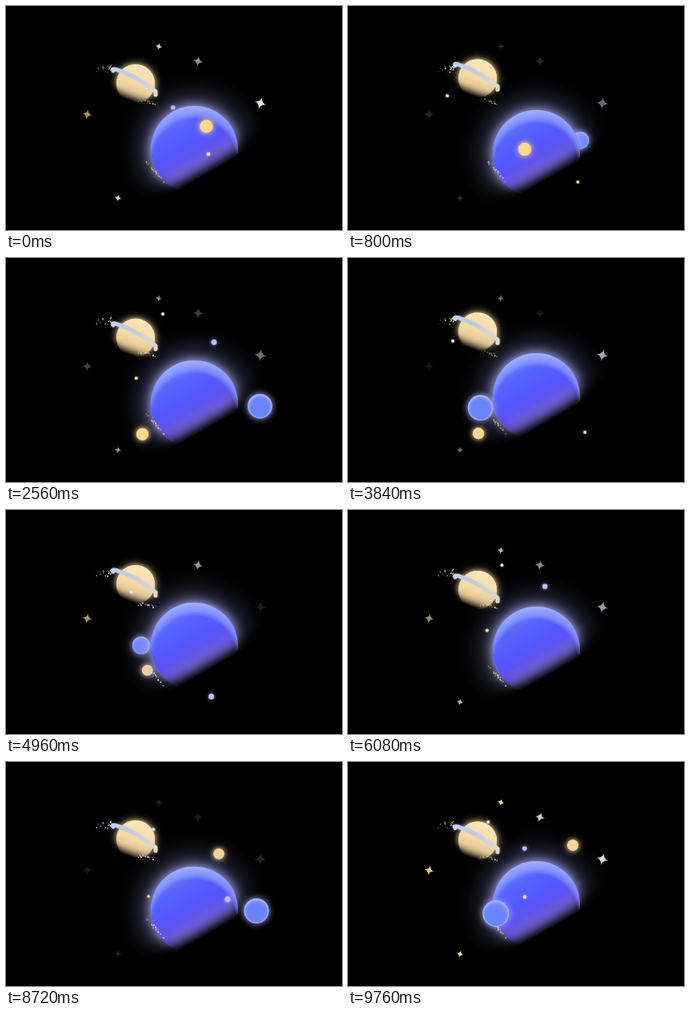
An HTML page with a canvas for the animation above (9840 ms loop, 420 px wide and 280 px high).

```html
<!DOCTYPE html>
<html lang="en">
<head>
<meta charset="utf-8">
<title>Planets</title>
<style>
  html, body { margin: 0; width: 100%; height: 100%; overflow: hidden; background: #000; }
  canvas { display: block; }
</style>
</head>
<body>
<canvas id="stage" width="420" height="280"></canvas>
<script>
const ctx = document.getElementById('stage').getContext('2d');
const LOOP = 9840, STEP = 80, ORBIT = 3320, TAU = Math.PI * 2;
const RAD = Math.PI / 180;
const cos = deg => Math.cos(deg * RAD);
const sin = deg => Math.sin(deg * RAD);
const wave = (t, peak, period = ORBIT) => Math.cos(TAU * (t - peak) / period);

function seeded(seed) {
  return () => (seed = (seed * 16807) % 2147483647) / 2147483647;
}

function gradient(g, stops) {
  stops.forEach(([at, color]) => g.addColorStop(at, color));
  return g;
}

function disc(x, y, r, fill, glow, blur = 0) {
  ctx.save();
  ctx.shadowColor = glow || 'transparent';
  ctx.shadowBlur = blur;
  ctx.fillStyle = fill;
  ctx.beginPath();
  ctx.arc(x, y, r, 0, TAU);
  ctx.fill();
  ctx.restore();
}

// Orbits: each returns a place, a radius and whether the moon is behind.
function blueMoon(t) {
  const a = 360 * (t - 2090) / 6094;
  const p = a + 28 * (1 - cos(a));
  return { x: 236 + 95 * cos(p), y: 178.5 + 13 * sin(p), r: 13.5 + 3.5 * sin(p), behind: sin(p) < -0.6, draw: drawBlue };
}

function goldMoon(t) {
  const p = 73 + 0.0345 * t - 7.8e-7 * t * t;
  const along = 88 * cos(p), across = 9 * sin(p);
  return { x: 226 + 0.72 * along + 0.69 * across, y: 162 - 0.69 * along + 0.72 * across,
    r: 7.2 + 0.8 * sin(p), behind: sin(p) < -0.2, draw: drawGold };
}

function lilacMoon(t) {
  const a = 52 + 360 * t / ORBIT;
  const p = a + 10 * cos(a - 20) - 6;
  return { x: 236 - 41 * sin(p) + 6.5 * cos(p) + 2.5 * sin(2 * p), y: 171 - 76 * cos(p),
    r: 3.2 - 0.6 * sin(p), behind: sin(p) > 0.4, draw: drawLilac };
}

function amberMoon(t) {
  const a = 20.6 + 360 * (t - 2560) / ORBIT;
  const p = a - 16 * cos(a);
  return { x: 229 - 67 * cos(p) + 5 * sin(p), y: 185 - 34 * cos(p) - 10 * sin(p),
    r: 2 + 0.3 * sin(p), behind: sin(p) < -0.72, draw: drawAmber };
}

function paleMoon(t) {
  const p = 82 + 360 * t / ORBIT;
  return { x: 160 + 36 * cos(p) - 3 * sin(p), y: 92 - 22 * cos(p) - 7 * sin(p),
    r: 2, behind: sin(p) > 0, draw: drawPale };
}

function drawBlue({ x, y, r }) {
  const fill = gradient(ctx.createRadialGradient(x, y + r * 0.15, r * 0.7, x, y, r),
    [[0, '#6a83ff'], [0.5, '#7a90ff'], [1, '#b0bcff']]);
  disc(x, y, r, fill, '#a9b2ff', 9);
}
function drawGold({ x, y, r }) {
  disc(x, y, r, '#f9d68e', '#e8c27c', 9);
  disc(x, y, r, '#f9d88f', 'rgba(250,215,150,.6)', 5);
}
const drawLilac = ({ x, y, r }) => disc(x, y, r, '#bdb9f4', 'rgba(180,180,255,.7)', 4);
const drawAmber = ({ x, y, r }) => disc(x, y, r, '#ffd98c', 'rgba(255,205,125,.6)', 3);
const drawPale = ({ x, y, r }) => disc(x, y, r, '#dcecf5', 'rgba(190,215,255,.6)', 3);

function bigPlanet(t) {
  const r = 54.5;
  ctx.save();
  ctx.translate(235.5, 178.3 + 8 * wave(t, 1500, 2 * ORBIT));
  const body = ctx.createLinearGradient(-27, -47, 17, 30);
  gradient(body, [[0, '#6f80ff'], [0.25, '#5663ff'], [0.5, '#5358ff'],
    [0.66, 'rgba(90,78,240,.95)'], [0.8, 'rgba(80,62,205,.6)'], [0.92, 'rgba(60,42,140,.18)'], [1, 'rgba(50,30,110,0)']]);
  disc(0, 0, r, body, 'rgba(165,165,255,.8)', 44);
  disc(0, 0, r, body, 'rgba(185,185,255,.9)', 13);

  // Pale cap
  ctx.beginPath();
  ctx.arc(0, 0, r, 0, TAU);
  ctx.clip();
  const cap = ctx.createRadialGradient(0, 14, 52, 0, 14, 69);
  gradient(cap, [[0, 'rgba(145,165,255,0)'], [0.35, 'rgba(145,165,255,.65)'], [1, 'rgba(170,185,255,.9)']]);
  ctx.fillStyle = cap;
  ctx.fillRect(-r, -r, 2 * r, r + 5);
  ctx.restore();
}

const ringBob = t => 5 * wave(t, 2700);

function ringedPlanet(t) {
  ctx.save();
  ctx.translate(0, ringBob(t));
  const body = ctx.createLinearGradient(169, 74, 154, 116);
  gradient(body, [[0, '#ffe6b6'], [0.5, '#f5d9a4'], [0.68, 'rgba(230,203,152,.85)'],
    [0.84, 'rgba(190,163,115,.35)'], [1, 'rgba(110,90,60,0)']]);
  disc(162, 95, 24, body, 'rgba(255,225,170,.8)', 12);
  disc(162, 95, 24, body, 'rgba(255,232,185,.6)', 5);
  ctx.restore();
}

function ring(t) {
  ctx.save();
  ctx.translate(0, ringBob(t));
  ctx.strokeStyle = gradient(ctx.createLinearGradient(132, 76, 190, 108),
    [[0, '#c3d3f5'], [0.35, '#bcc9e0'], [0.75, '#d2d5dc'], [1, '#f3dbb0']]);
  ctx.lineWidth = 5;
  ctx.lineCap = ctx.lineJoin = 'round';
  ctx.shadowColor = 'rgba(190,205,240,.6)';
  ctx.shadowBlur = 3;
  ctx.beginPath();
  ctx.moveTo(134, 79);
  ctx.quadraticCurveTo(132, 76, 138, 77.5);
  ctx.quadraticCurveTo(164, 86, 187, 105);
  ctx.lineTo(187, 109);
  ctx.stroke();
  ctx.restore();
}

// Specks lie along a slanted band and swap between gold and white.
function specks(t, seed, count, x, y, dx, dy, spread) {
  const next = seeded(seed);
  for (let i = 0; i < count; i++) {
    const k = Math.sqrt(next()), off = (next() - 0.5) * spread, flip = next();
    const px = x + dx * k + off * 0.6, py = y + dy * k + off;
    ctx.globalAlpha = 0.6 + 0.4 * wave(t, flip * ORBIT);
    ctx.fillStyle = wave(t, 3200) + flip > 0.4 ? '#ffdc8a' : '#e6e5ff';
    const size = 0.9 + 0.8 * next();
    ctx.fillRect(px, py, size, size);
  }
  ctx.globalAlpha = 1;
}

function star(x, y, r, color, light) {
  ctx.save();
  ctx.translate(x, y);
  ctx.rotate(0.3 * light);
  ctx.globalAlpha = light;
  ctx.fillStyle = color;
  ctx.beginPath();
  for (let i = 0; i <= 4; i++) {
    const a = i * 90, px = r * cos(a), py = r * sin(a);
    if (i) ctx.quadraticCurveTo(0.2 * r * cos(a - 45), 0.2 * r * sin(a - 45), px, py);
    else ctx.moveTo(px, py);
  }
  ctx.fill();
  ctx.restore();
}

const twinkle = (t, peak, period) => Math.pow(0.5 + 0.5 * wave(t, peak, period), 1.5);

function stars(t) {
  const slow = twinkle(t, 3120);
  const quick = 0.1 + 0.8 * twinkle(t, 1390, ORBIT / 2);
  star(191, 50.5, 4.2, '#ffdf9f', slow);
  star(140, 240, 4.4, '#ffdf9f', slow);
  star(101.5, 135.5, 6, '#ffe0a0', quick);
  star(240, 69, 6.2, '#dbe3ee', quick);
  star(318, 121.5, 7.2, '#e1e6ee', 0.1 + 0.9 * twinkle(t, 3330));
}

function render(t) {
  ctx.fillStyle = '#000';
  ctx.fillRect(0, 0, 420, 280);
  stars(t);

  const pale = paleMoon(t);
  if (pale.behind) pale.draw(pale);
  ringedPlanet(t);
  ring(t);
  specks(t, 71, 22, 113, 83, 18, -9, 9);
  specks(t, 38, 17, 163, 116, 22, 5, 5);
  if (!pale.behind) pale.draw(pale);

  const moons = [blueMoon, goldMoon, lilacMoon, amberMoon].map(orbit => orbit(t));
  moons.filter(m => m.behind).forEach(m => m.draw(m));
  bigPlanet(t);
  specks(t, 915, 28, 175, 197, 19, 18, 13);
  moons.filter(m => !m.behind).sort((a, b) => a.r - b.r).forEach(m => m.draw(m));
}

const start = performance.now();
function tick() {
  const t = (performance.now() - start) % LOOP;
  render(Math.floor(t / STEP) * STEP);
  requestAnimationFrame(tick);
}
tick();
</script>
</body>
</html>
```
